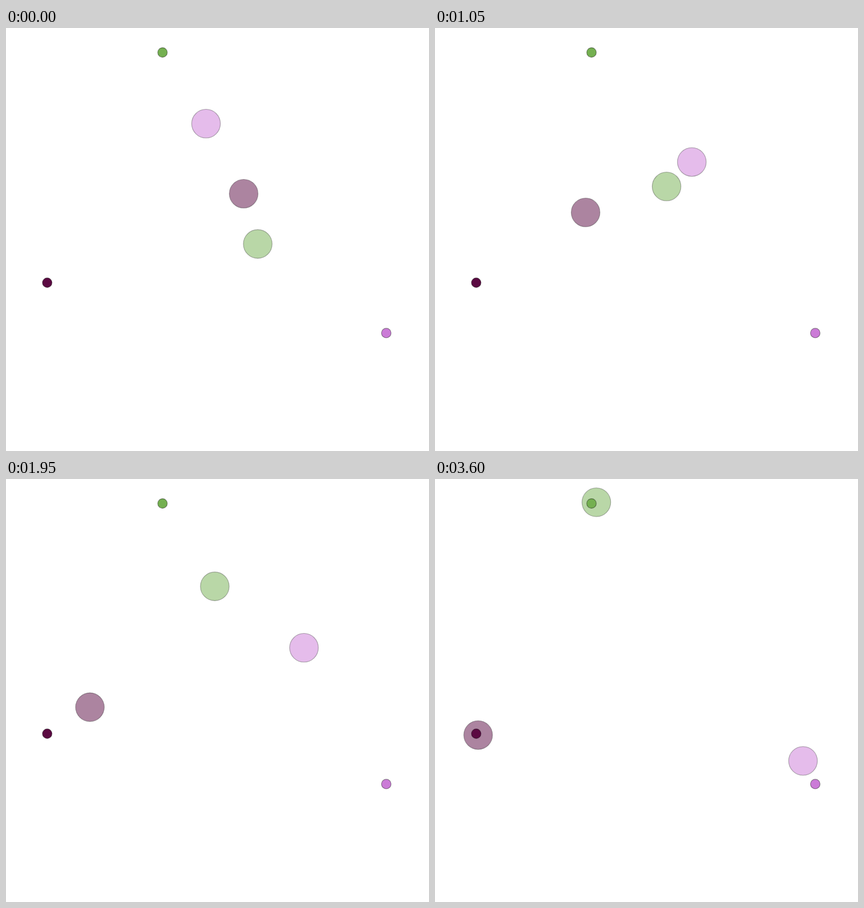
Write an HTML page that moves like this. It is 700 by 700 pixels and loops after 3750 ms.

```html
<!DOCTYPE html>
<html lang="en">
<head>
<meta charset="utf-8">
<title>Agents and goals</title>
<style>
  html, body { margin: 0; width: 100%; height: 100%; overflow: hidden; background: #fff; }
  svg { display: block; width: 100%; height: 100%; }
</style>
</head>
<body>
<svg id="stage" viewBox="0 0 700 700"></svg>
<script>
const LOOP = 3750, STEP = 150;
const stage = document.getElementById('stage');

// Each agent passes its waypoints at these shared steps.
const knots = [0, 2, 5, 7, 9, 11, 16, 20, 24];
const agents = [
  {
    color: '#cb7bd7', goal: [629.3, 504.8],
    x: [331, 344, 386, 425, 460, 480.5, 513.5, 564.8, 609],
    y: [158.3, 185.5, 227, 221.7, 213.5, 238, 344, 415, 466.5]
  },
  {
    color: '#5b0a42', goal: [68.2, 421.5],
    x: [393.3, 364, 295.8, 249.2, 210.5, 172.3, 96.2, 76.2, 71.4],
    y: [274.2, 281, 294, 305.2, 327.5, 350.2, 414, 424, 423.7]
  },
  {
    color: '#74b050', goal: [259, 40.5],
    x: [416.6, 404.5, 397.2, 383.2, 371, 357.5, 325.2, 281, 267],
    y: [357.4, 340.5, 278.4, 262.3, 242, 219.5, 113.8, 59, 38.5]
  }
];

function circle(r, color, fill, edge) {
  const c = document.createElementNS('http://www.w3.org/2000/svg', 'circle');
  const attrs = {
    r, fill: color, 'fill-opacity': fill,
    stroke: '#000', 'stroke-opacity': edge, 'stroke-width': 1.1
  };
  for (const key in attrs) c.setAttribute(key, attrs[key]);
  stage.appendChild(c);
  return c;
}

function place(c, x, y) {
  c.setAttribute('cx', x);
  c.setAttribute('cy', y);
}

// Smooth curve through the waypoints.
function spline(v, s) {
  const last = knots.length - 1;
  const i = Math.max(1, knots.findIndex(k => k >= s));
  const slope = j => {
    const a = Math.max(0, j - 1), b = Math.min(last, j + 1);
    return (v[b] - v[a]) / (knots[b] - knots[a]);
  };
  const h = knots[i] - knots[i - 1];
  const u = (s - knots[i - 1]) / h, w = 1 - u;
  return v[i - 1] * w * w * (1 + 2 * u) + v[i] * u * u * (1 + 2 * w)
    + h * u * w * (slope(i - 1) * w - slope(i) * u);
}

for (const a of agents) a.body = circle(23.75, a.color, 0.5, 0.3);
for (const a of agents) place(circle(7.9, a.color, 1, 0.4), ...a.goal);

function draw(ms) {
  const step = Math.floor((ms % LOOP) / STEP);
  for (const a of agents) place(a.body, spline(a.x, step), spline(a.y, step));
}

const start = performance.now();
function tick() {
  draw(performance.now() - start);
  requestAnimationFrame(tick);
}
tick();
</script>
</body>
</html>
```
